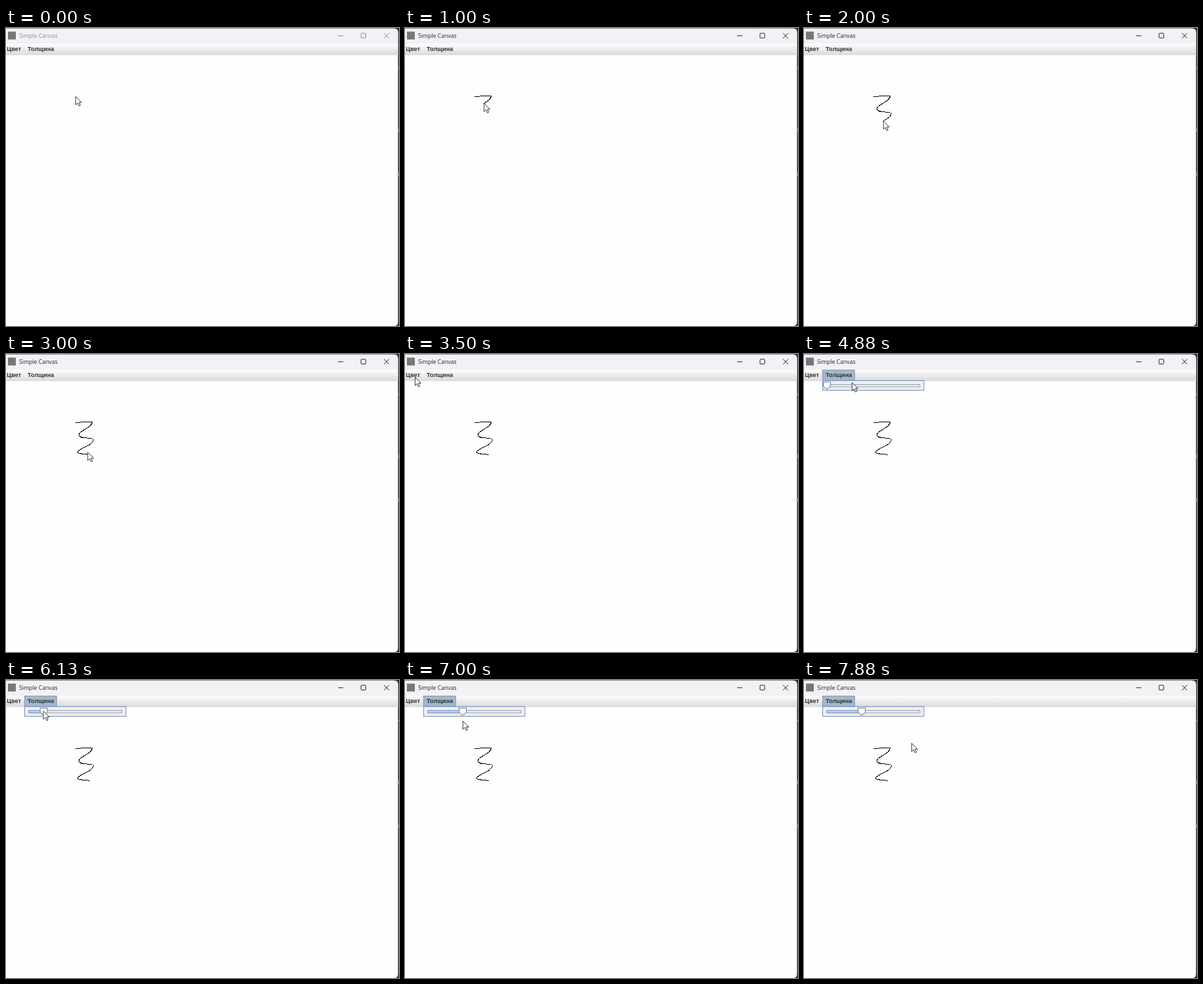
These frames come from a looping animation (600x454 px, 8 s). An HTML page:

```html
<!DOCTYPE html>
<html lang="ru">
<head>
<meta charset="utf-8">
<title>Simple Canvas</title>
<style>
  html, body { margin: 0; width: 100%; height: 100%; overflow: hidden; background: #343436; }
  svg { display: block; width: 600px; height: 454px; }
  .title { font: 8.7px "Open Sans", sans-serif; }
  .menu { font: bold 9.2px "Liberation Sans", Arial, sans-serif; fill: #333; }
  .line { fill: none; stroke-width: 1; }
  .selected { fill: #a3b8cc; stroke: #7a8a99; stroke-width: .8; }
  .popup { fill: #eee; stroke: #6382bf; stroke-width: .9; }
  .track { fill: #eee; stroke: #7f8b98; stroke-width: .8; }
  .filled { fill: #c3d5ea; stroke: #6382bf; stroke-width: .8; }
  .thumb { fill: url(#thumbFill); stroke: #566f8e; stroke-width: .9; }
</style>
</head>
<body>
<svg viewBox="0 0 600 454">
  <defs>
    <linearGradient id="barFill" x2="0" y2="1">
      <stop offset="0" stop-color="#fdfdfd"/><stop offset="1" stop-color="#dadada"/>
    </linearGradient>
    <linearGradient id="thumbFill" x2="0" y2="1">
      <stop offset=".45" stop-color="#fff"/><stop offset="1" stop-color="#cbdcf0"/>
    </linearGradient>
    <clipPath id="frame"><path d="M0 .7H592.5Q598.5 .7 598.5 7V448Q598.5 454 592.5 454H0Z"/></clipPath>
  </defs>
  <path d="M599 60h1v3h-1zM599 153h1v6h-1zM599 220h1v6h-1z" fill="#888"/>
  <g clip-path="url(#frame)">
    <rect width="600" height="454" fill="#fefefe"/>
    <rect width="600" height="24" fill="#f3f1f5"/>
    <rect x="3" y="5.5" width="12" height="12" fill="#77777b"/>
    <text id="title" class="title" x="20" y="15.3">Simple Canvas</text>
    <g id="buttons" class="line">
      <path d="M507 11.8h8M577 7.7l8 8M585 7.7l-8 8"/>
      <rect x="542" y="8" width="7.2" height="7.2" rx="1"/>
    </g>
    <rect y="24" width="600" height="17.3" fill="url(#barFill)"/>
    <rect id="colorTab" class="selected" x="-.5" y="24.3" width="28" height="16"/>
    <rect id="widthTab" class="selected" x="28.3" y="24.3" width="49" height="16"/>
    <text class="menu" x="1.3" y="35">Цвет</text>
    <text class="menu" x="33" y="35">Толщина</text>
    <path id="pen" class="line" stroke="#000" shape-rendering="crispEdges" transform="translate(.3 .3)"
      d="M106 104L131 103C132 112 111 116 111 123S133 126 133 130C133 139 110 144 109 149C109 152 118 152 128 153"/>
    <g id="popup"></g>
    <path id="pointer" d="M0 0V12.6L3 9.9L5 14.5L7.1 13.6L5.1 9.2H9Z" fill="#fff" stroke="#222" stroke-width=".9"/>
  </g>
</svg>
<script>
const LOOP = 8000, TICK = 125;
// Moments below are counted in ticks
const PEN_DOWN = 2, PEN_UP = 21, COLOR_OPEN = 29, WIDTH_OPEN = 39, GRAB = 46;
const TRACK_LENGTH = 142, WIDTH_MIN = 35, WIDTH_MAX = 88;

const moves = [
  { from: 23, to: 28, x: 15, y: 35 },
  { from: 38, to: 39, x: 73, y: 43 },
  { from: 42, to: 45, x: 36, y: 45 },
  { from: 46, to: 50, x: 58, y: 47 },
  { from: 50, to: 53, x: 88, y: 62 },
  { from: 56, to: 63, x: 164, y: 96 }
];

const el = id => document.getElementById(id);
const show = (id, on) => el(id).setAttribute("visibility", on ? "visible" : "hidden");
const clamp = (v, min, max) => Math.min(max, Math.max(min, v));
const progress = (tick, from, to) => clamp((tick - from) / (to - from), 0, 1);
const easeInOut = p => p < .5 ? 4 * p ** 3 : 1 - 4 * (1 - p) ** 3;

const penLength = el("pen").getTotalLength();

function pointerAt(tick, drawn) {
  let { x, y } = el("pen").getPointAtLength(drawn);
  for (const move of moves) {
    const p = easeInOut(progress(tick, move.from, move.to));
    x += (move.x - x) * p;
    y += (move.y - y) * p;
  }
  return { x, y };
}

function slider(x, y, value) {
  const bar = (name, width) => `<rect class="${name}" x="${x}" y="${y - 1.8}" width="${width}" height="3.6"/>`;
  return bar("track", TRACK_LENGTH) + (value > x ? bar("filled", value - x) : "") +
    `<path class="thumb" transform="translate(${value} ${y})" d="M-5.5 -5.5H5.5V1L0 6L-5.5 1Z"/>`;
}

function colorPopup() {
  const rows = [..."HSB"].map((label, i) => {
    const y = 48.2 + i * 12.2;
    return `<text class="menu" x="-2.4" y="${y + 3.8}">${label}</text>` +
      slider(156.8, y, 156.8 + (label === "S" ? TRACK_LENGTH : 0));
  });
  return '<rect class="popup" x="-2" y="40.4" width="307.1" height="39.7"/>' + rows.join("");
}

function widthPopup(value) {
  return '<rect class="popup" x="28.4" y="40.4" width="154.7" height="14.9"/>' + slider(WIDTH_MIN, 48.2, value);
}

function draw(time) {
  const tick = Math.floor(time % LOOP / TICK);
  const drawn = penLength * progress(tick, PEN_DOWN, PEN_UP);
  const { x, y } = pointerAt(tick, drawn);
  const ink = tick >= PEN_DOWN ? "#222" : "#8c8c8f";
  const widthOpen = tick >= WIDTH_OPEN, colorOpen = tick >= COLOR_OPEN && !widthOpen;
  const thumb = tick < GRAB ? WIDTH_MIN : clamp(x + 1, WIDTH_MIN, WIDTH_MAX);

  el("title").setAttribute("fill", ink);
  el("buttons").setAttribute("stroke", ink);
  el("pen").setAttribute("stroke-dasharray", `${drawn} 999`);
  show("colorTab", colorOpen);
  show("widthTab", widthOpen);
  el("popup").innerHTML = colorOpen ? colorPopup() : widthOpen ? widthPopup(thumb) : "";
  el("pointer").setAttribute("transform", `translate(${x + .4} ${y + .4})`);
}

const start = performance.now();
function loop() {
  draw(performance.now() - start);
  requestAnimationFrame(loop);
}
loop();
</script>
</body>
</html>
```
